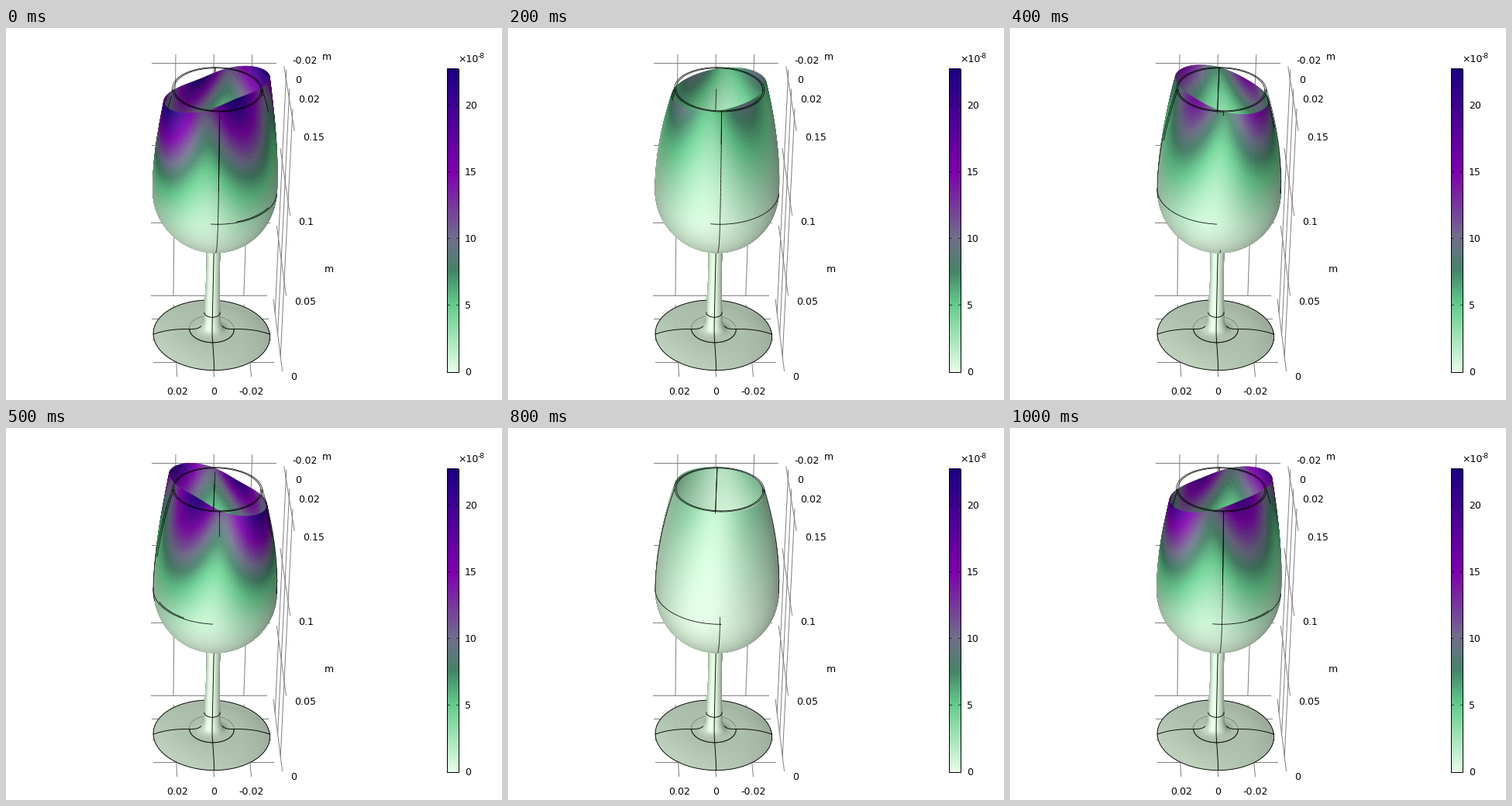
Recreate the animation shown at these times as a matplotlib script. Size 640x480 px, loop 1100 ms.

```python
import numpy as np
import matplotlib.pyplot as plt
from matplotlib.animation import FuncAnimation
from matplotlib.collections import LineCollection, PolyCollection
from matplotlib.colors import LinearSegmentedColormap

W, H, DPI = 640, 480, 100
PX = 72 / DPI
STEPS = 11

# Camera: horizontal distance, height, pitch, focal length
CAM = np.array([0, 0.81, 0.61])
PITCH = np.radians(33.4)
FOCAL = 2414
LIGHT = np.array([-0.3, 0.93, 0.2])
BACK_LIGHT = np.array([-0.2, -0.87, 0.45])

# Glass dimensions in metres
Z_BASE, Z_WIDE, Z_RIM = 0.06, 0.0925, 0.152
R_WIDE, R_RIM, R_FOOT = 0.0317, 0.0223, 0.0315
R_RING, Z_RING = 0.012, 0.0035
R_STEM, Z_STEM = 0.0042, 0.0145
WALL = 0.0008

# Mode shape
AXIS = np.radians(38.5)
PEAK = 0.41 * R_RIM
V_MAX = 22.7

# Axis box: tick unit, line half-length, wall offset, floor
UNIT, SPAN, BOX, FLOOR = 0.98, 0.032, 0.0358, -0.0038

STOPS = {0: (229, 253, 229), 5: (100, 203, 140), 7.5: (70, 132, 105),
         10: (113, 110, 140), 15: (126, 0, 172), V_MAX: (28, 0, 130)}
CMAP = LinearSegmentedColormap.from_list(
    "aurora", [(v / V_MAX, np.array(c) / 255) for v, c in STOPS.items()], N=512)


def project(p):
    """World points to pixel positions and camera depth."""
    x, y, z = np.moveaxis(np.asarray(p, float), -1, 0)
    c, s = np.cos(PITCH), np.sin(PITCH)
    depth = (CAM[1] - y) * c + (CAM[2] - z) * s
    up = (z - CAM[2]) * c + (CAM[1] - y) * s
    py = 244 - FOCAL * up / depth
    px = 272.7 - 0.0237 * (py - 79.5) + FOCAL * (x + 0.06 * y) / depth
    return np.stack([px, py], -1), depth


def bowl_radius(z):
    low = np.clip((Z_WIDE - z) / (Z_WIDE - Z_BASE), 0, 1)
    high = np.clip((z - Z_WIDE) / (Z_RIM - Z_WIDE), 0, 1)
    return R_WIDE * np.sqrt(1 - low**2) - (R_WIDE - R_RIM) * high**1.9


def displacement(z, q, amp):
    """Radial and tangential sway of the two-lobed mode."""
    a = amp * PEAK * np.clip((z - Z_BASE) / (Z_RIM - Z_BASE), 0, 1) ** 2.1
    return a * np.cos(2 * q), -a / 2 * np.sin(2 * q)


def revolve(r, z, phi, amp=0):
    ur, ut = displacement(z, phi - AXIS, amp)
    c, s = np.cos(phi), np.sin(phi)
    x = (r + ur) * c - ut * s
    y = -(r + ur) * s - ut * c
    return np.stack(np.broadcast_arrays(x, y, z), -1), np.hypot(ur, ut)


def inside(p, amp):
    """True where points lie within the swaying bowl wall."""
    x, y, z = np.moveaxis(p, -1, 0)
    r = np.maximum(bowl_radius(z), 1e-6)
    psi = np.arctan2(-y, x) - AXIS
    q = psi.copy()
    for _ in range(12):
        ur, ut = displacement(z, q, amp)
        q += 0.8 * (psi - q - np.arctan2(ut, r + ur))
    ur, ut = displacement(z, q, amp)
    return np.hypot(x, y) < np.hypot(r + ur, ut)


def visible(p, amp):
    """March from each point to the camera and look for a wall crossing."""
    ray = CAM - p
    ray /= np.linalg.norm(ray, axis=-1, keepdims=True)
    steps = 0.00005 + 0.13 * np.linspace(0, 1, 60) ** 2
    path = p[..., None, :] + ray[..., None, :] * steps[:, None]
    flag = inside(path, amp)
    hit = (flag[..., 1:] != flag[..., :-1]) & (path[..., 1:, 2] < Z_RIM)
    return ~hit.any(-1)


def corners(a):
    return np.stack([a[:-1, :-1], a[1:, :-1], a[1:, 1:], a[:-1, 1:]], 2)


def shaded_quads(r, z, amp=0, n=180):
    """Depth-sorted screen quads and their lit colours."""
    phi = np.linspace(0, 2 * np.pi, n + 1)
    p, mag = revolve(r[:, None], z[:, None], phi, amp)
    around = np.roll(p[:, :-1], -1, 1) - np.roll(p[:, :-1], 1, 1)
    around = np.concatenate([around, around[:, :1]], 1)
    normal = np.cross(np.gradient(p, axis=0), around)
    normal /= np.linalg.norm(normal, axis=-1, keepdims=True) + 1e-15
    normal *= np.sign(np.sum(normal * (CAM - p), -1, keepdims=True))
    lit = np.clip(normal @ LIGHT, 0, 1)[..., None]
    back = np.clip(normal @ BACK_LIGHT, 0, 1)[..., None]
    rgb = CMAP(mag / PEAK)[..., :3]
    rgb = rgb * (0.56 + 0.4 * lit + 0.25 * back) + 0.09 * lit**8
    rgb = np.clip(rgb, 0, 1)

    xy, depth = project(p)
    quads = corners(xy).reshape(-1, 4, 2)
    tint = corners(rgb).mean(2).reshape(-1, 3)
    order = np.argsort(-corners(depth).mean(2).ravel())
    return quads[order], tint[order]


fig = plt.figure(figsize=(W / DPI, H / DPI), dpi=DPI, facecolor="white")
ax = fig.add_axes([0, 0, 1, 1])
ax.axis("off")


def add_mesh(quads, tint, order):
    mesh = PolyCollection(quads, facecolors=tint, edgecolors="face",
                          linewidths=0.5 * PX, zorder=order)
    ax.add_collection(mesh)
    return mesh


def draw(points, order, color="black", width=0.9):
    ax.plot(*project(points)[0].T, color=color, lw=width * PX, zorder=order)


def trace(r, z, phi, order):
    draw(revolve(r, z, phi)[0], order)


def label(x, y, text, size=12.5, ha="left"):
    ax.text(x, y, text, fontsize=size * PX, family="DejaVu Sans",
            ha=ha, va="center_baseline")


def tick_label(point, dx, dy, value, ha="left"):
    x, y = project(point)[0]
    label(x + dx, y + dy, f"{value:g}", ha=ha)


def grid_line(start, end):
    draw([start, end], 1, "0.5", 1)


# Axis box on the back wall, right wall and floor
for value in (-0.02, 0, 0.02):
    v = value * UNIT
    grid_line((v, -BOX, 0), (v, -BOX, Z_RIM))
    grid_line((BOX, v, 0), (BOX, v, Z_RIM))
    grid_line((v, -SPAN, FLOOR), (v, SPAN, FLOOR))
    grid_line((-SPAN, v, FLOOR), (SPAN, v, FLOOR))
    tick_label((v, SPAN, FLOOR), 0, 18, -value, "center")
    tick_label((BOX, v, Z_RIM), 7.5, -13, value)
for value in (0, 0.05, 0.1, 0.15):
    z = value * UNIT
    grid_line((-SPAN, -BOX, z), (SPAN, -BOX, z))
    grid_line((BOX, -SPAN, z), (BOX, SPAN, z))
    tick_label((BOX, SPAN, z), 11, 7, value)
label(407.5, 36, "m")
label(410.5, 310, "m")

# Colour bar
LEFT, RIGHT, TOP, BOTTOM = 568.5, 583.5, 53, 443.5
ax.imshow(np.linspace(1, 0, 400)[:, None], cmap=CMAP, aspect="auto",
          extent=(LEFT, RIGHT, BOTTOM, TOP), zorder=2)
ax.plot([LEFT, RIGHT, RIGHT, LEFT, LEFT], [TOP, TOP, BOTTOM, BOTTOM, TOP],
        color="black", lw=PX, zorder=3)
for value in range(0, 21, 5):
    y = BOTTOM - value / V_MAX * (BOTTOM - TOP)
    for x in (LEFT, RIGHT - 3):
        ax.plot([x, x + 3], [y, y], color="black", lw=0.7 * PX, zorder=3)
    label(592, y - 0.5, str(value))
label(583.5, 39.5, "×10")
label(609, 35.5, "-8", size=9)
ax.set_xlim(0, W)
ax.set_ylim(H, 0)

# Foot and stem stay still
full = np.linspace(0, 2 * np.pi, 200)
front = np.linspace(np.pi, 2 * np.pi, 100)

u = np.linspace(0, 1, 24)
foot_r = R_FOOT + (R_RING - R_FOOT) * u
foot_z = Z_RING * (1 - (1 - u) ** 2.5)
fillet_r = R_RING - (R_RING - R_STEM) * np.sin(u * np.pi / 2) ** 0.6
fillet_z = Z_STEM - (Z_STEM - Z_RING) * np.cos(u * np.pi / 2).clip(0) ** 0.6
stem_r = R_STEM - 0.0018 * u + 0.0014 * u**3
stem_z = Z_STEM + 0.047 * u
post_r = np.r_[fillet_r, stem_r[1:]]
post_z = np.r_[fillet_z, stem_z[1:]]

add_mesh(*shaded_quads(foot_r, foot_z), 4)
trace(R_FOOT, 0.0, full, 5)
trace(R_RING, Z_RING, full, 5)
add_mesh(*shaded_quads(post_r, post_z, n=90), 6)
trace(R_RING, Z_RING, front, 7)
trace(R_STEM, Z_STEM, front, 7)
for side in (0, np.pi):
    trace(foot_r, foot_z, side, 5)
    trace(fillet_r[:12], fillet_z[:12], side, 7)
trace(np.r_[foot_r, post_r], np.r_[foot_z, post_z], 1.5 * np.pi, 7)

# Bowl profile and the rest-shape edges drawn over it
curve = np.linspace(0.1, np.pi / 2, 24)
bowl_z = np.r_[Z_WIDE - (Z_WIDE - Z_BASE) * np.cos(curve),
               np.linspace(Z_WIDE, Z_RIM, 40)[1:]]
bowl_r = bowl_radius(bowl_z)

loop = np.linspace(0, 2 * np.pi, 180)
rise = np.linspace(Z_BASE + 0.0004, Z_RIM, 180)
edges = []
for inset in (0, WALL):
    edges.append(revolve(R_RIM - inset, Z_RIM, loop)[0])
    edges.append(revolve(R_WIDE - inset, Z_WIDE, loop)[0])
    for quarter in range(4):
        edges.append(revolve(bowl_radius(rise) - inset, rise, quarter * np.pi / 2)[0])
edges = np.array(edges)
edge_xy, _ = project(edges)
segments = np.stack([edge_xy[:, :-1], edge_xy[:, 1:]], 2)

bowl = add_mesh([], [], 8)
lines = LineCollection([], colors="black", linewidths=0.8 * PX, zorder=9)
ax.add_collection(lines)


def update(i):
    amp = np.cos(2 * np.pi * i / STEPS)
    quads, tint = shaded_quads(bowl_r, bowl_z, amp)
    bowl.set_verts(quads)
    bowl.set_facecolor(tint)
    seen = visible(edges, amp)
    lines.set_segments(segments[seen[:, 1:] & seen[:, :-1]])
    return bowl, lines


anim = FuncAnimation(fig, update, frames=STEPS, interval=100, repeat=True)
plt.show()
```
